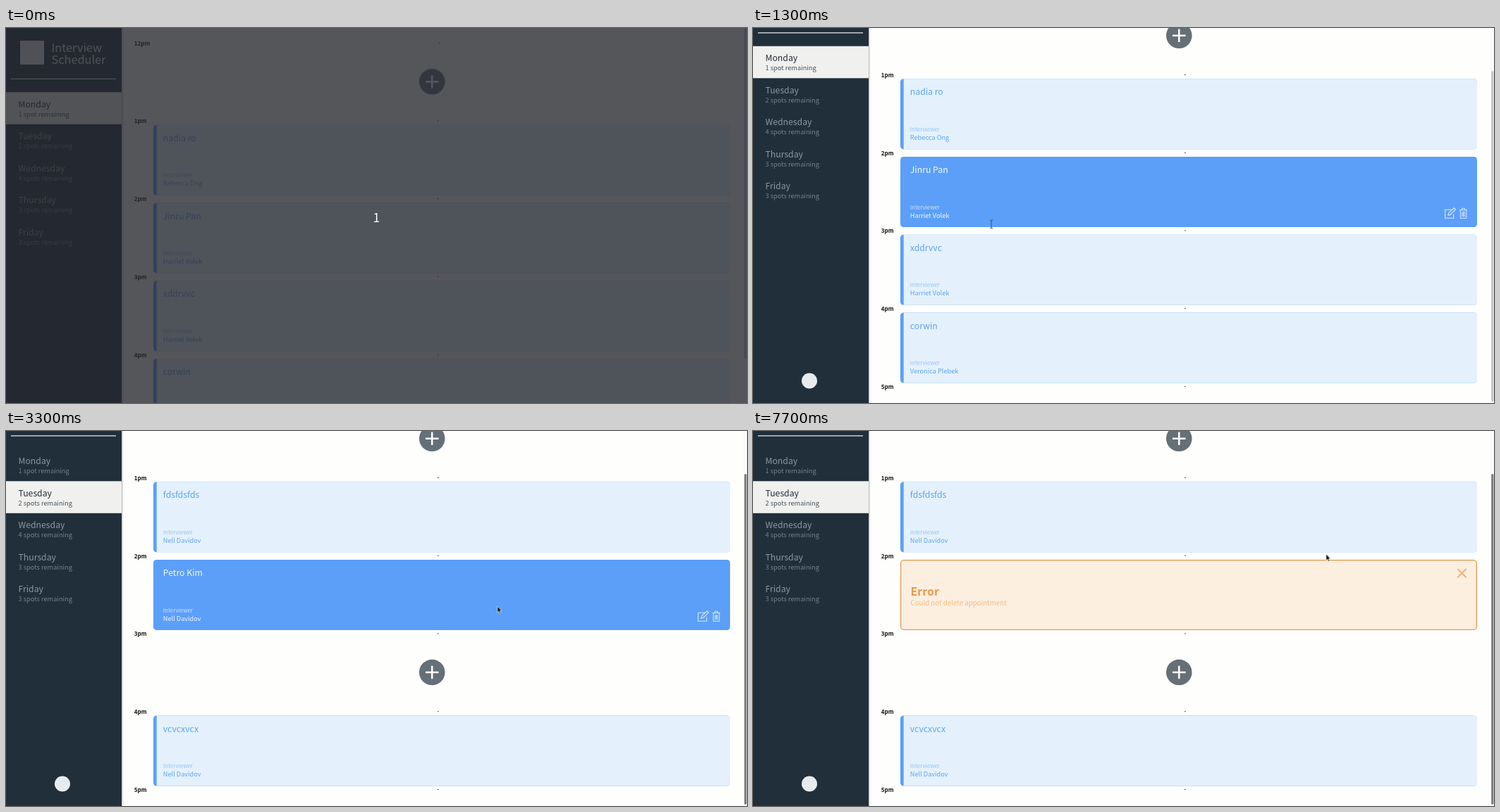
An HTML page for the animation above (8 s loop, 1051 by 533 pixels).

```html
<!DOCTYPE html>
<html lang="en">
<head>
<meta charset="utf-8">
<title>Interview Scheduler</title>
<style>
  html, body { margin: 0; height: 100%; overflow: hidden; background: #fefefd; }
  svg { display: block; width: 1051px; height: 533px; }
  text { font: 12.24px "Noto Sans CJK JP", "Noto Sans CJK SC", "Noto Sans CJK", "Noto Sans", sans-serif; white-space: pre; }
  .title { font-size: 16.3px; font-weight: 300; fill: #e6e9eb; }
  .small { font-size: 9.25px; font-weight: 300; }
  .hour { font-size: 8.16px; font-weight: 700; fill: #111; }
  .label { font-size: 7.9px; font-weight: 300; }
  .person { font-size: 9.2px; font-weight: 500; }
  .head { font-size: 15.9px; font-weight: 700; }
  .note { font-size: 9.7px; font-weight: 300; }
  .count { font-size: 17.5px; fill: #fff; }
  .mid { text-anchor: middle; }
  .line { fill: none; stroke-width: 1.2; }
</style>
</head>
<body>
<svg id="stage" viewBox="0 0 1051 533"></svg>
<script>
const LOOP = 8000, STEP = 100, MAX_SCROLL = 65.5;
const ROW = 110.75, CARD_TOP = 27, CARD_H = 100, LEFT = 209, RIGHT = 1027;
const DAY_TOP = 91.3, DAY_H = 45.5;
const BLUE = '#5b9ff8', PALE = '#e4f1fc', RED = '#cd4151', ROSE = '#f9e0e2';

const days = [['Monday', 1], ['Tuesday', 2], ['Wednesday', 4], ['Thursday', 3], ['Friday', 3]];
const hours = ['12pm', '1pm', '2pm', '3pm', '4pm', '5pm'];
const bookings = [
  [null, ['nadia ro', 'Rebecca Ong'], ['Jinru Pan', 'Harriet Volek'], ['xddrvvc', 'Harriet Volek'], ['corwin', 'Veronica Plebek']],
  [null, ['fdsfdsfds', 'Nell Davidov'], ['Petro Kim', 'Nell Davidov'], null, ['vcvcxvcx', 'Nell Davidov']]
];

// Pointer path: time, x, y
const path = [
  [300, 640, 86], [500, 560, 160], [700, 448, 246], [900, 352, 282], [1000, 352, 282],
  [1300, 338, 279], [1500, 215, 220], [1800, 90, 100], [1900, 95, 109], [2100, 130, 165],
  [2300, 216, 211], [2600, 340, 315], [2800, 352, 325], [2900, 356, 339], [3100, 356, 339],
  [3300, 697, 249], [3600, 930, 258], [4000, 1000, 264], [4400, 1007, 268], [5000, 1007, 268],
  [5500, 760, 312], [5800, 668, 288], [6100, 660, 264], [6400, 660, 264], [7300, 813, 175]
];

const clamp = (v, lo, hi) => Math.min(hi, Math.max(lo, v));
const inside = (p, x, y, w, h) => p.x >= x && p.x <= x + w && p.y >= y && p.y <= y + h;
const text = (s, x, y, cls = '', fill = '') =>
  `<text x="${x}" y="${y}" class="${cls}"${fill && ` fill="${fill}"`}>${s}</text>`;
const rect = (x, y, w, h, fill, rx = 0, extra = '') =>
  `<rect x="${x}" y="${y}" width="${w}" height="${h}" fill="${fill}" rx="${rx}" ${extra}/>`;
const lines = (d, stroke, width = 1.2) =>
  `<path class="line" d="${d}" stroke="${stroke}" style="stroke-width:${width}"/>`;
const at = (x, y, body) => `<g transform="translate(${x} ${y})">${body}</g>`;

function pointerAt(t) {
  const i = path.findIndex(k => k[0] >= t);
  if (i < 0) return { x: path.at(-1)[1], y: path.at(-1)[2] };
  const b = path[i], a = path[Math.max(0, i - 1)];
  const k = a === b ? 0 : (t - a[0]) / (b[0] - a[0]);
  return { x: a[1] + (b[1] - a[1]) * k, y: a[2] + (b[2] - a[2]) * k };
}

function sidebar(selected, p) {
  const items = days.map(([name, spots], i) => {
    const y = DAY_TOP + i * DAY_H, on = i === selected;
    const hover = inside(p, 0, y, 164, DAY_H);
    return (on || hover ? rect(0, y, 164, DAY_H, on ? '#f0f0ee' : '#2f3d48') : '') +
      text(name, 17.5, y + 21.3, '', on ? '#212f3a' : '#8d979f') +
      text(`${spots} spot${spots > 1 ? 's' : ''} remaining`, 17.5, y + 34.3, 'small', on ? '#46525c' : '#76828b');
  });
  return rect(0, 0, 164, 600, '#212f3a') + rect(164, 0, 1, 600, '#bcc1c4') + rect(165, 0, 1.5, 600, '#ebecec') +
    rect(20, 18, 34, 34, '#e8ebed') +
    text('Interview', 64.5, 34, 'title') + text('Scheduler', 64.5, 50.7, 'title') +
    lines('M7 72.3H156', '#e9ebec') + items.join('') +
    '<circle cx="80" cy="567" r="11" fill="#e8ebed"/>';
}

const addButton = () =>
  '<circle cx="604.3" cy="49.3" r="18.3" fill="#656f76"/>' + lines('M595 49.3h18.6M604.3 40v18.6', '#fff', 2.5);

const icons = () =>
  lines('M991 75.3h-9.3v12h12v-5.5M986 83.2l.8-3.2 7.4-7.2 2.3 2.3-7.4 7.3z', '#dce9fd', 1.1) +
  lines('M1002 75.6h11M1005.5 75.4v-2h4v2M1003.2 75.8v11.6h8.6v-11.6M1005.8 78v7M1007.5 78v7M1009.2 78v7', '#dce9fd', 1);

function card([name, interviewer], hover) {
  const ink = hover ? '#f4f8ff' : '#5ea3ec';
  return rect(LEFT, 0, RIGHT - LEFT, CARD_H, BLUE, 4.5) +
    (hover ? icons() : `<path d="M213.7 0H1022.5q4.5 0 4.5 4.5V95.5q0 4.5-4.5 4.5H213.7z" fill="${PALE}"/>`) +
    text(name, 222.8, 23, '', ink) +
    text('Interviewer', 222.8, 74.7, 'label', hover ? '#cfe2fd' : '#96c3f2') +
    text(interviewer, 222.8, 86.5, 'person', ink);
}

const panel = (fill, stroke) =>
  rect(LEFT + .6, .6, RIGHT - LEFT - 1.2, CARD_H - 1.2, fill, 4.5, `stroke="${stroke}" stroke-width="1.3"`);

function button(label, x, p) {
  const hover = inside(p, x, 70.8, 72, 17.5);
  return rect(x + .6, 71.2, 71.2, 16.8, hover ? RED : 'none', 8.4, `stroke="${RED}" stroke-width="1.2"`) +
    text(label, x + 36, 84.4, 'mid', hover ? '#fff' : RED);
}

const confirmCard = p => panel(ROSE, RED) +
  text('Delete the Appointment?', 618, 29, 'head mid', RED) +
  button('Cancel', 541, p) + button('Confirm', 623, p);

const statusCard = t => rect(LEFT, 0, RIGHT - LEFT, CARD_H, PALE, 4.5) +
  `<g transform="rotate(${t * .36} 575.5 51.7)">` +
  '<circle cx="575.5" cy="51.7" r="11.5" class="line" stroke="#c3dcf8" style="stroke-width:2.4"/>' +
  lines('M575.5 40.2a11.5 11.5 0 0 1 11.5 11.5', BLUE, 2.4) + '</g>' +
  text('Deleting', 607, 57, 'head', BLUE);

const errorCard = () => panel('#fcefe0', '#e39b50') +
  text('Error', 223.5, 51.2, 'head', '#ec994b') +
  text('Could not delete appointment', 223.5, 64.8, 'note', '#f2bb82') +
  lines('M999.3 12.9l12.4 12.4M1011.7 12.9l-12.4 12.4', '#efb075', 2);

function schedule(day, t, p) {
  return hours.map((hour, i) => {
    const y = i * ROW, top = y + CARD_TOP, booking = bookings[day][i];
    const local = { x: p.x, y: p.y - top };
    let body = '';
    if (i === 2 && t >= 7700) body = errorCard();
    else if (i === 2 && t >= 6500) body = statusCard(t);
    else if (i === 2 && t >= 5000) body = confirmCard(local);
    else if (booking) body = card(booking, inside(local, LEFT, 0, RIGHT - LEFT, CARD_H));
    else if (i < 5) body = addButton();
    return text(hour, 181.7, y + 24.5, 'hour') + rect(i ? 612 : 614.2, y + 20.7, 1.8, 1, '#444') + at(0, top, body);
  }).join('');
}

function cursor(p, beam) {
  const shape = beam
    ? lines('M-2-6q2 0 2 1.5v9q0 1.5-2 1.5M2-6q-2 0-2 1.5M2 6q-2 0-2-1.5', '#37475c', .9)
    : '<path d="M0 0v9l2-1.8 1.5 3.1 1.4-.6-1.5-3h2.7z" fill="#111" stroke="#fff" stroke-width=".6"/>';
  return at(p.x, p.y, shape);
}

function scene(t) {
  const intro = t < 200;
  const scroll = MAX_SCROLL * clamp((t - 1000) / 200, 0, 1);
  const day = t >= 1800 ? 1 : 0;
  const p = intro ? { x: -99, y: -99 } : pointerAt(t);
  const onPage = { x: p.x, y: p.y + scroll };
  return rect(0, 0, 1051, 533, '#fefefd') +
    at(0, -scroll, sidebar(day, onPage) + schedule(day, t, onPage)) +
    rect(1046, 0, 5, 533, '#fafafa') +
    rect(1047.2, scroll * .93, 3.2, 470, day ? '#7b7b7b' : '#c3c3c3', 1.6) +
    (intro
      ? rect(0, 0, 1051, 533, 'rgba(38,39,46,.78)') + text('1', 525.3, 276, 'count mid')
      : cursor(p, t >= 900 && t <= 1300));
}

const stage = document.getElementById('stage');
let shown = -1;
function tick(now) {
  const t = Math.floor(now % LOOP / STEP) * STEP;
  if (t !== shown) stage.innerHTML = scene(shown = t);
  requestAnimationFrame(tick);
}
tick(performance.now());
</script>
</body>
</html>
```
